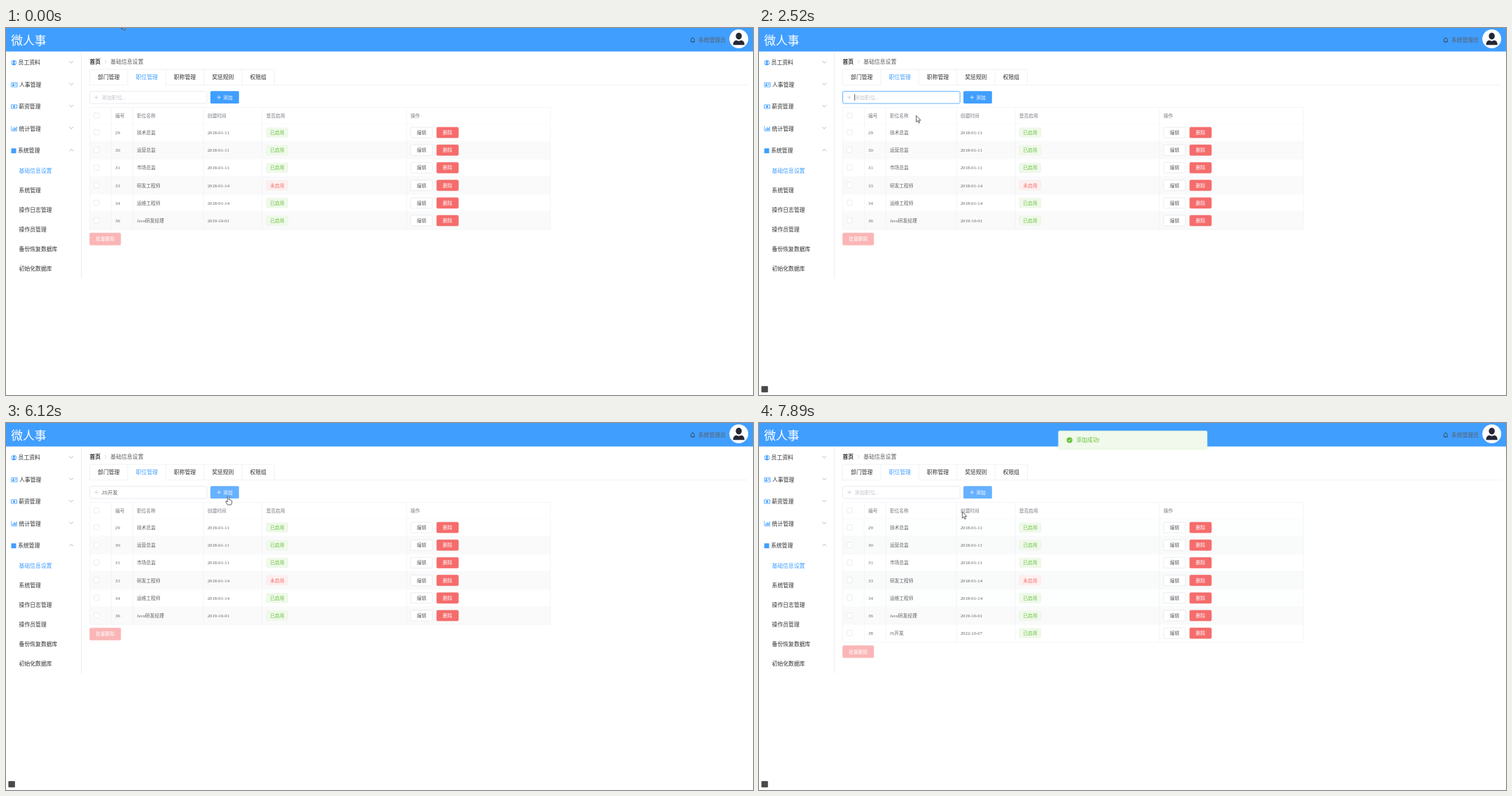
An HTML page that plays this animation: 1067 by 525 pixels, repeating every 8000 ms.

```html
<!DOCTYPE html>
<html lang="zh-CN">
<head>
<meta charset="utf-8">
<title>职位管理</title>
<style>
html, body { margin: 0; width: 100%; height: 100%; overflow: hidden; background: #fff; }
svg { display: block; width: 100vw; height: 100vh; }
text { font-family: 'Liberation Sans', 'Noto Sans CJK SC', 'Noto Sans CJK', sans-serif; white-space: pre; }
.serif { font-family: 'Liberation Serif', 'Noto Sans CJK SC', 'Noto Sans CJK', serif; }
</style>
</head>
<body>
<svg id="stage" viewBox="0 0 1067 525"></svg>
<script>
const BLUE = '#409eff', DARK = '#303133', GREY = '#606266', LINE = '#ebeef5', EDGE = '#dcdfe6', FAINT = '#c0c4cc', RED = '#f56c6c', GREEN = '#67c23a';
const stage = document.getElementById('stage');

function add(tag, attrs = {}, parent = stage) {
  const node = document.createElementNS('http://www.w3.org/2000/svg', tag);
  set(node, attrs);
  parent.append(node);
  return node;
}
function set(node, attrs) {
  for (const key in attrs) node.setAttribute(key, attrs[key]);
}
const group = (parent = stage) => add('g', {}, parent);
const rect = (x, y, width, height, fill, extra = {}, parent) =>
  add('rect', { x, y, width, height, fill, ...extra }, parent);
const stroke = (d, color, width = 0.56, parent) =>
  add('path', { d, fill: 'none', stroke: color, 'stroke-width': width }, parent);
const show = (node, on) => set(node, { visibility: on ? 'visible' : 'hidden' });

// Text placed by its vertical centre
function label(str, x, cy, size, fill, extra = {}, parent) {
  const node = add('text', { x, y: cy + size * 0.37, 'font-size': size, fill, ...extra }, parent);
  node.textContent = str;
  return node;
}
const MID = { 'text-anchor': 'middle' };
const BOLD = { 'font-weight': 700 };
const box = (x, y, w, h, fill, edge, parent) =>
  rect(x, y, w, h, fill, { stroke: edge, 'stroke-width': 0.6, rx: 1.6 }, parent);

function button(str, x, y, w, h, fill, edge, color, parent) {
  box(x, y, w, h, fill, edge, parent);
  label(str, x + w / 2, y + h / 2, 6.72, color, { ...MID, 'font-weight': 500 }, parent);
}
const plus = (x, y, color) => stroke(`M${x - 2.8} ${y}h5.6M${x} ${y - 2.8}v5.6`, color, 0.7);

function drawHeader() {
  rect(0, 0, 1067, 33.6, BLUE);
  label('微人事', 7.3, 17.6, 16.8, '#fff');
  stroke('M977.6 19.6h6.4M978.4 19.4v-2.6a2.4 2.4 0 0 1 4.8 0v2.6M980.8 14.3v-.9M980 20.7h1.6', DARK, 0.7);
  label('系统管理员', 989, 17.2, 7.84, '#5c6066');
  add('circle', { cx: 1046.7, cy: 15.5, r: 13.5, fill: '#fff' });
  add('ellipse', { cx: 1046.7, cy: 11.6, rx: 4.3, ry: 4.8, fill: '#242736' });
  add('path', { d: 'M1038.6 24.2q-.2-5.2 4.2-6.6l3.9 1.2 3.9-1.2q4.4 1.4 4.2 6.6z', fill: '#242736' });
}

function drawSidebar() {
  stroke('M107.6 33.6V358', '#e6e6e6', 0.7);
  const heads = [['员工资料', 17.6], ['人事管理', 19], ['薪资管理', 18.2], ['统计管理', 18.6], ['系统管理', 17.2]];
  heads.forEach(([name, x], i) => {
    const y = 49.4 + i * 31.4;
    label(name, x, y, 7.84, DARK);
    stroke(i < 4 ? `M90.4 ${y - 2}l2.8 2.6 2.8-2.6` : `M90.4 ${y + 1}l2.8-2.6 2.8 2.6`, '#909399', 0.65);
  });
  add('circle', { cx: 11.3, cy: 49.6, r: 3.5, fill: 'none', stroke: BLUE, 'stroke-width': 0.8 });
  add('circle', { cx: 11.3, cy: 48.4, r: 1.6, fill: BLUE });
  add('path', { d: 'M8.7 51.6q2.6-2.6 5.2 0-2.6 2.6-5.2 0z', fill: BLUE });
  stroke('M7.7 78.3h8.4v5.9h-8.4zM12.8 80h2.3M12.8 81.6h2.3', BLUE, 0.8);
  add('path', { d: 'M8.8 83q0-1.8 1.2-2a1 1 0 1 1 1 0q1.2.2 1.2 2z', fill: BLUE });
  stroke('M7.6 109.9h7.9v5.1h-7.9z', BLUE, 0.9);
  add('circle', { cx: 11.5, cy: 112.4, r: 1.6, fill: BLUE });
  stroke('M7.8 140v7.2h8.4', BLUE, 0.7);
  stroke('M9.8 146.4v-2.4M11.6 146.4v-4.6M13.3 146.4v-3.4M15 146.4v-5.4', BLUE, 1.1);
  rect(7.5, 172.2, 7, 7, BLUE);
  ['基础信息设置', '系统管理', '操作日志管理', '操作员管理', '备份恢复数据库', '初始化数据库'].forEach((name, i) =>
    label(name, 18.6, 204 + i * 28, 7.84, i ? DARK : BLUE));
}

function drawTabs() {
  label('首页', 119.5, 48.3, 7.84, DARK, BOLD);
  stroke('M141 46l2.3 2.4-2.3 2.4', FAINT, 0.7);
  label('基础信息设置', 149.3, 48.3, 7.84, GREY);
  const edges = [119.5, 174, 228.3, 282.6, 337, 383.4];
  stroke('M119.5 81.6V60.6q0-1.4 1.4-1.4H382q1.4 0 1.4 1.4V81.6', '#e4e7ed');
  stroke('M119.5 81.6H174M228.3 81.6H1060', '#e4e7ed');
  ['部门管理', '职位管理', '职称管理', '奖惩规则', '权限组'].forEach((name, i) => {
    if (i) stroke(`M${edges[i]} 59.2V81.6`, '#e4e7ed');
    label(name, (edges[i] + edges[i + 1]) / 2, 70.2, 7.84, i === 1 ? BLUE : DARK, MID);
  });
}

const TOP = 137, ROW = 25.2;
const columns = [150.4, 181.2, 282, 366, 572];
const records = [
  ['29', '技术总监', '2018-01-11', 1], ['30', '运营总监', '2018-01-11', 1], ['31', '市场总监', '2018-01-11', 1],
  ['33', '研发工程师', '2018-01-14', 0], ['34', '运维工程师', '2018-01-14', 1],
  ['36', 'Java研发经理', '2019-10-01', 1], ['38', 'JS开发', '2022-10-07', 1]
];
const SERIF = { class: 'serif' };

function drawFrame(top, bottom, parent) {
  stroke(`M119.5 ${top}V${bottom}H777.6V${top}` + columns.map(x => `M${x} ${top}V${bottom}`).join(''), LINE, 0.6, parent);
}
const checkbox = (cy, parent) => box(125.5, cy - 3.9, 7.6, 7.6, '#fff', EDGE, parent);

function drawHeadRow() {
  drawFrame(113.6, TOP);
  stroke('M119.5 113.6H777.6', LINE);
  checkbox(125.3);
  ['编号', '职位名称', '创建时间', '是否启用', '操作'].forEach((name, i) =>
    label(name, columns[i] + 5.7, 125.4, 6.72, '#777a80'));
}

function drawRow([id, name, date, enabled], i) {
  const g = group(), top = TOP + i * ROW, cy = top + ROW / 2 - 0.1;
  rect(119.5, top, 658, ROW, i % 2 ? '#fafafa' : '#fff', {}, g);
  const glow = rect(119.5, top, 658, ROW, '#f5f7fa', { opacity: 0 }, g);
  drawFrame(top, top + ROW, g);
  checkbox(cy - 0.2, g);
  [id, name, date].forEach((str, c) => label(str, columns[c] + 5.7, cy, 6.72, GREY, SERIF, g));
  box(372, cy - 6.6, 30.6, 13.2, enabled ? '#f0f9eb' : '#fef0f0', enabled ? '#e1f3d8' : '#fde2e2', g);
  label(enabled ? '已启用' : '未启用', 387.3, cy, 6.72, enabled ? GREEN : RED, MID, g);
  button('编辑', 578, cy - 7.6, 31, 15.2, '#fff', EDGE, GREY, g);
  button('删除', 615.2, cy - 7.6, 31, 15.2, RED, RED, '#fff', g);
  return { g, glow };
}

drawHeader();
drawSidebar();
drawTabs();

const input = box(119.6, 90.6, 167.5, 17.4, '#fff', EDGE);
plus(129, 99.2, FAINT);
const typed = label('', 136.6, 99.2, 7.28, GREY);
const caret = rect(0, 94.6, 0.7, 9, '#222');
const veil = group();
rect(119, 90, 168.6, 18.6, '#fff', { opacity: 0.8 }, veil);
const clip = add('clipPath', { id: 'field' });
rect(119, 90, 168.6, 18.3, '#000', {}, clip);
const spinner = stroke('', BLUE, 0.9, veil);
set(spinner, { 'clip-path': 'url(#field)' });
const addButton = rect(292, 90.2, 40.8, 17.8, BLUE, { rx: 1.6 });
plus(304.2, 99.2, '#fff');
label('添加', 310.3, 99.2, 6.72, '#fff', { 'font-weight': 500 });

drawHeadRow();
const rows = records.map(drawRow);
const batch = group();
button('批量删除', 119.6, 293.2, 44.3, 17.4, '#fab6b6', '#fab6b6', '#fff', batch);
const badge = rect(3.4, 512.2, 9.4, 9, '#484848', { rx: 1 });

const message = group();
box(427.7, 11.3, 212.4, 26.6, '#f0f9eb', '#e1f3d8', message);
add('circle', { cx: 443.6, cy: 24.5, r: 4.1, fill: GREEN }, message);
stroke('M441.6 24.6l1.5 1.5 2.6-2.8', '#fff', 0.8, message);
label('添加成功!', 453.2, 24.3, 7.84, GREEN, {}, message);

const popup = group();
const popupBox = rect(145.5, 107, 0, 21.5, '#fff', { stroke: '#c8c8c8', 'stroke-width': 0.6 }, popup);
const choices = label('', 150, 117.6, 9, '#222', {}, popup);

const pointers = {
  arrow: add('path', { d: 'M0 0V9.3L2.1 7.3 3.5 10.7 5 10 3.6 6.9H6.4Z' }),
  hand: add('path', { d: 'M-1 1Q0-.7 1 1V4.8L4 5.6Q5.5 6 5.4 7.5V9.6L4.3 12.4H-.8L-3.4 8.2Q-3.4 6.8-2.4 7L-1 8.4Z' }),
  beam: add('path', { d: 'M-2-5Q0-5 0-4V4Q0 5-2 5M2-5Q0-5 0-4V4Q0 5 2 5' })
};
for (const name in pointers) set(pointers[name], { fill: name === 'beam' ? 'none' : '#fff', stroke: '#111', 'stroke-width': 0.65 });

// time, x, y
const path = [
  [0, 165.2, -7.5], [230, 165.2, -7.5], [600, 262, 52], [900, 320, 101], [1050, 317.7, 104.6], [1090, 317.7, 104.6],
  [1480, 150, 100], [1830, 138, 101], [2080, 168, 133], [2340, 224.6, 125.2], [5470, 224.6, 125.2],
  [5800, 275, 119], [6060, 317.3, 104.6], [7000, 317.3, 104.6], [7270, 310, 297], [7640, 302, 276], [7880, 290.4, 126.8]
];
// time, field text, right edge of the candidate box, candidates
const typing = [
  [0, ''], [3150, 'J'], [3280, 'JS'], [4140, 'JSk'],
  [4210, 'JSka', 449, '1 卡   2 开   3 看   4 咖   5 喀   6 咔   7 靠   8 考   9 抗'],
  [4450, 'JSkai', 449, '1 开   2 凯   3 楷   4 慨   5 揩   6 铠   7 恺'],
  [4720, "JSkai'f", 520, '1 开发   2 开放   3 开房   4 开方   5 开饭   6 开封   7 开赴'],
  [4790, "JSkai'fa", 480, '1 开发   2 开法   3 开罚   4 开   5 凯   6 楷   7 慨'],
  [5100, 'JS开发'], [6480, '']
];
// moments when the caret turns on or off, in turn
const caretTimes = [1520, 2020, 2520, 3020, 3150, 3780, 4140, 5670];

const clamp = v => Math.max(0, Math.min(1, v));
const latest = (table, t) => table.filter(step => step[0] <= t).pop();

function pointAt(t) {
  const i = path.findIndex(key => key[0] > t);
  if (i < 0) return path[path.length - 1].slice(1);
  const [t0, x0, y0] = path[i - 1], [t1, x1, y1] = path[i];
  const p = (t - t0) / (t1 - t0);
  return [x0 + (x1 - x0) * p, y0 + (y1 - y0) * p];
}
const rowAt = t => Math.floor((pointAt(t)[1] - TOP) / ROW);

function drawField(t) {
  const focused = t >= 1520 && t < 6060;
  const [, str, edge, list] = latest(typing, t);
  set(input, { stroke: focused ? BLUE : EDGE, 'stroke-width': focused ? 0.8 : 0.6 });
  typed.textContent = str || '添加职位...';
  set(typed, { fill: str ? GREY : FAINT });
  set(caret, { x: 136.4 + (str ? typed.getComputedTextLength() : 0) });
  show(caret, caretTimes.filter(m => m <= t).length % 2);
  show(popup, edge);
  if (edge) {
    set(popupBox, { width: edge - 145.5 });
    choices.textContent = list;
  }
}

function drawLoading(t) {
  set(veil, { opacity: Math.min(clamp((t - 6440) / 250), 1 - clamp((t - 6740) / 300)) });
  const from = (111 + (t - 6760) * 0.18) * Math.PI / 180;
  const sweep = clamp((t - 6440) / 520) * 224 * Math.PI / 180;
  const at = a => `${203.4 + 9.4 * Math.cos(a)} ${99.3 + 9.4 * Math.sin(a)}`;
  set(spinner, { d: `M${at(from)}A9.4 9.4 0 ${sweep > Math.PI ? 1 : 0} 1 ${at(from + sweep)}` });
}

function drawPointer(t) {
  const [x, y] = pointAt(t);
  const inBar = y > 90 && y < 108;
  const kind = inBar && x > 292 && x < 333 ? 'hand' : inBar && x > 119 && x < 287 ? 'beam' : 'arrow';
  for (const name in pointers) show(pointers[name], name === kind);
  set(pointers[kind], { transform: `translate(${x} ${y})` });
}

function render(t) {
  drawField(t);
  drawLoading(t);
  drawPointer(t);
  set(addButton, { fill: t >= 6060 ? '#66b1ff' : t > 1110 && t < 1160 ? '#5cadff' : BLUE });
  show(badge, t >= 230);

  const added = t >= 6740;
  show(rows[6].g, added);
  set(batch, { transform: `translate(0 ${added ? ROW : 0})` });
  // Row highlight fades over a quarter second
  const recent = [0, 50, 100, 150, 200].map(ago => rowAt(Math.max(0, t - ago)));
  rows.forEach((row, i) => set(row.glow, { opacity: recent.filter(r => r === i).length / 5 }));

  const slide = clamp((t - 6440) / 400);
  set(message, {
    opacity: clamp((t - 6440) / 300),
    transform: `translate(0 ${-26.6 * (1 - slide) ** 3})`
  });
}

const start = performance.now();
function tick() {
  render((performance.now() - start) % 8000);
  requestAnimationFrame(tick);
}
tick();
</script>
</body>
</html>
```
